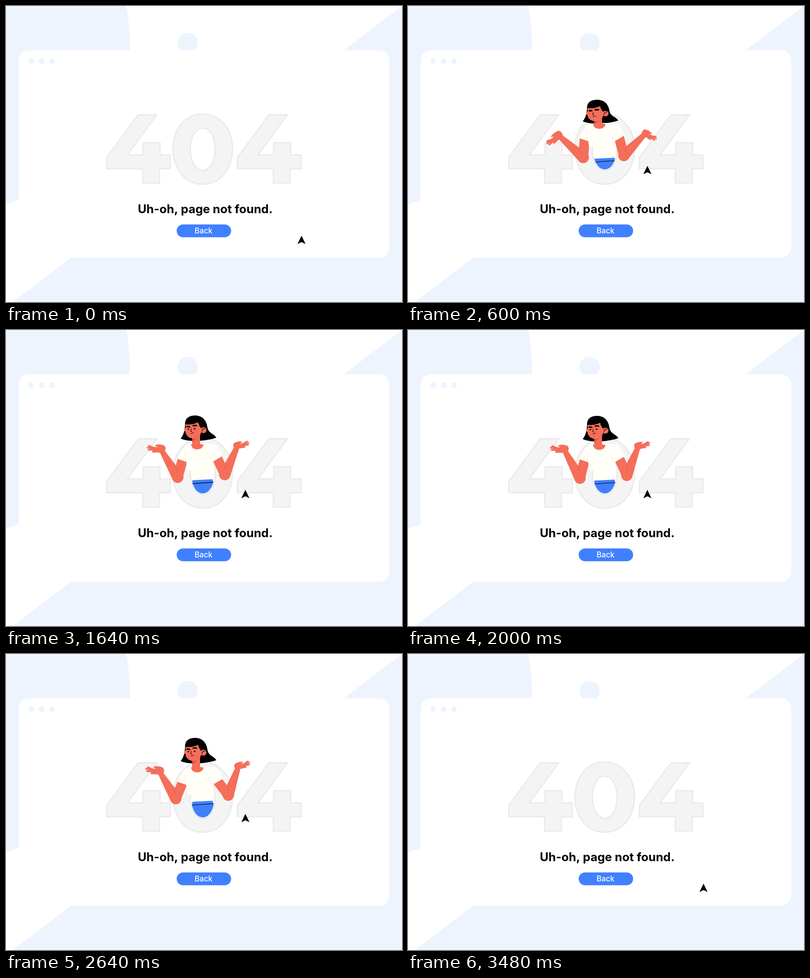
Write an HTML page with a canvas that moves like this. It is 800 px wide and 600 px high and loops after 3520 ms.

```html
<!DOCTYPE html>
<html lang="en">
<head>
<meta charset="utf-8">
<title>404</title>
<style>
  html, body { margin: 0; width: 100%; height: 100%; overflow: hidden; background: #fff; }
  canvas { display: block; width: 800px; height: 600px; }
</style>
</head>
<body>
<canvas id="stage" width="800" height="600"></canvas>
<script>
const ctx = document.getElementById('stage').getContext('2d');
const LOOP = 3520, STEP = 40;
const PALE = '#edf4fe', BLUE = '#4080ff', SKIN = '#f46e59', SHADE = '#d9553f', SHIRT = '#fffef7', INK = '#000';

// Pose: vertical offsets of head, torso and belt, then joints, hand tilt and width factor.
const pose = (head, torso, belt, leftElbow, leftWrist, rightElbow, rightWrist, tilt, width = 1) =>
  [head, torso, belt, ...leftElbow, ...leftWrist, ...rightElbow, ...rightWrist, tilt, width];

const hidden = pose(165, 165, 165, [375, 430], [380, 380], [420, 430], [415, 380], -60, 0.5);
const leap = pose(-87, -78, -72, [345, 225], [286, 185], [447, 220], [498, 180], -12);
const squash = pose(11.5, 5, 3.5, [354, 307], [306, 264], [436, 303], [478, 260], 42);
const wide = pose(11, 4, 3.5, [354, 308], [298, 267], [436, 304], [486, 266], 36);
const rest = pose(0, 0, 0, [348, 302], [319, 245], [442, 296], [462, 239], 0);
const lift = pose(-2, -2, -1.5, [347, 298.5], [314, 244], [442, 293], [467, 237], 0);
const rise = pose(-5, -4, -6.5, [343, 293], [311, 240], [449, 286], [469, 230], -3);
const peak = pose(-27, -24, -22, [350, 270], [318, 218], [442, 266], [462, 212], -12);

const keys = [
  [360, hidden], [480, leap], [600, squash], [660, wide], [860, lift], [1160, rest], [1220, rest],
  [1700, lift], [2300, rest], [2340, rest], [2640, rise], [2700, peak], [2840, hidden]
];

const clamp = v => Math.min(1, Math.max(0, v));
const sineEase = u => (1 - Math.cos(Math.PI * u)) / 2;
const cubicEase = u => u < 0.5 ? 4 * u ** 3 : 1 - 4 * (1 - u) ** 3;
const mix = (a, b, u) => a + (b - a) * u;

function poseAt(t) {
  const i = keys.findIndex(k => k[0] > t);
  const [t0, a] = keys[i - 1], [t1, b] = keys[i];
  const u = sineEase((t - t0) / (t1 - t0));
  return a.map((v, n) => mix(v, b[n], u));
}

function fill(d, color) {
  ctx.fillStyle = color;
  ctx.fill(new Path2D(d));
}

function line(d, width, color = INK, cap = 'round') {
  ctx.strokeStyle = color;
  ctx.lineWidth = width;
  ctx.lineCap = cap;
  ctx.stroke(new Path2D(d));
}

function disc(x, y, r, color) {
  ctx.fillStyle = color;
  ctx.beginPath();
  ctx.arc(x, y, r, 0, 7);
  ctx.fill();
}

function box(x, y, w, h, r, color) {
  ctx.fillStyle = color;
  ctx.beginPath();
  ctx.roundRect(x, y, w, h, r);
  ctx.fill();
}

function label(text, x, y, font, color) {
  ctx.font = font;
  ctx.fillStyle = color;
  ctx.textAlign = 'center';
  ctx.fillText(text, x, y);
}

// Slightly squared oval, as in a heavy zero.
function oval(cx, cy, rx, ry) {
  const kx = rx * 0.57, ky = ry * 0.59;
  return `M${cx - rx},${cy} C${cx - rx},${cy - ky} ${cx - kx},${cy - ry} ${cx},${cy - ry}
    S${cx + rx},${cy - ky} ${cx + rx},${cy} S${cx + kx},${cy + ry} ${cx},${cy + ry}
    S${cx - rx},${cy + ky} ${cx - rx},${cy} Z `;
}

const four = new Path2D('M267,220.5H304.5L245,302H277V277H311V302H332V330H310V359H276V330H203.5V307Z');
const zero = new Path2D(oval(397.5, 290, 60, 71.3) + oval(397.5, 290.5, 25, 43));
const opening = new Path2D(oval(397.5, 290, 23.5, 41.3) + 'M0,0H800V285H0Z');

function backdrop() {
  ctx.fillStyle = '#fff';
  ctx.fillRect(0, 0, 800, 600);
  disc(-95, 70, 345, PALE);
  disc(367, 75, 20.5, PALE);
  fill('M800,0V600H14Z', PALE);
  box(26, 90, 748, 420, 20, '#fff');
  for (const x of [51, 72, 93]) disc(x, 112, 5.6, PALE);

  ctx.lineJoin = 'miter';
  ctx.lineWidth = 2.6;
  ctx.strokeStyle = '#eaeaea';
  ctx.fillStyle = '#f4f4f4';
  for (const [shape, dx] of [[four, 0], [zero, 0], [four, 264]]) {
    ctx.save();
    ctx.translate(dx, 0);
    ctx.fill(shape, 'evenodd');
    ctx.stroke(shape);
    ctx.restore();
  }
  label('Uh-oh, page not found.', 402.5, 420, '700 24px Inter, sans-serif', INK);
  box(344.8, 442.7, 110, 26, 13, BLUE);
  label('Back', 399, 461, '500 15.3px Inter, sans-serif', '#fff');
}

function forearm(ex, ey, wx, wy) {
  const a = Math.atan2(wy - ey, wx - ex) + Math.PI / 2;
  const c = Math.cos(a), s = Math.sin(a), r = 11.5, q = 5;
  fill(`M${ex + c * r},${ey + s * r}L${wx + c * q},${wy + s * q}
    L${wx - c * q},${wy - s * q}L${ex - c * r},${ey - s * r}Z`, SKIN);
  disc(ex, ey, r, SKIN);
  disc(wx, wy, q, SKIN);
}

function hand(x, y, tilt, side, scale) {
  ctx.save();
  ctx.translate(x, y);
  ctx.scale(side * scale, scale);
  ctx.rotate(tilt * Math.PI / 180);
  fill('M-5,3C-8,-1 -8,-7 -4,-9C2,-11 8,-11 12,-9Q11,-7 6,-6L14,-6L17,0Q12,4 5,4Z', SKIN);
  line('M12,-4L22,-8M13,-3L24.5,-5M12,-1L23,-1M9,2L15,2.5', 3, SKIN);
  ctx.restore();
}

function arm(side, shoulderX, shoulderY, ex, ey, wx, wy, tilt) {
  line(`M${shoulderX},${shoulderY}L${ex},${ey}`, 20, SKIN, 'butt');
  forearm(ex, ey, wx, wy);
  if (side < 0) hand(wx, wy, tilt, side, 1.15);
  else hand(wx, wy, tilt - 9, side, 1);
  const dx = wx - ex, dy = wy - ey;
  line(`M${ex - side * 3 + dx * 0.22},${ey + dy * 0.4}l${-dx * 0.12},${-dy * 0.22}`, 0.7, SHADE);
}

function body(torso, belt) {
  const t = y => y + torso, b = y => y + belt;
  fill(`M377,${b(305)}L417,${b(303)}L421,${b(318)}V345H374V${b(318)}Z`, BLUE);
  line(`M376,${b(313)}Q398,${b(311)} 420,${b(310)}`, 1.2);
  fill(`M374,${t(233)}Q362,${t(234)} 358,${t(241)}L346,${t(263)}L364,${t(269)}
    L366,${t(281)}Q370,${b(297)} 377,${b(306)}L417,${b(304)}Q424,${b(296)} 421,${t(284)}
    L416,${t(270)}L438,${t(257)}Q432,${t(240)} 423,${t(233)}L398,${t(232)}Z`, SHIRT);
  line(`M360,${t(248)}L363,${t(268)}M407,${t(250)}L416,${t(269)}`, 0.8, '#ece9df');
}

function neck(torso, head) {
  const y = torso + 238;
  fill(`M376,${head + 213}V${y - 3}H392V${head + 210}Z`, SKIN);
  fill(`M376,${head + 222}Q386,${head + 221} 390,${head + 217}L377,${head + 229}Z`, SHADE);
  fill(`M374,${y - 4}Q375,${y + 6} 387,${y + 6}Q398,${y + 5} 399,${y - 4}L392,${y - 5}H376Z`, SKIN);
}

// Head space drops with the head and flattens a little when it sinks.
function inHead(head, paint) {
  ctx.save();
  ctx.translate(0, head + 227);
  ctx.scale(1, 1 - 0.07 * clamp(head / 12));
  ctx.translate(0, -227);
  paint();
  ctx.restore();
}

function backHair() {
  fill(`M353,222C359,214 361,206 362,192C362,181 369,175.3 382,175.3C397,175.3 405,185 407,200
    C410,212 419,211 425,220C410,226.5 370,230.5 353,222Z`, INK);
}

function face(squint) {
  disc(363.5, 204.5, 3.6, SKIN);
  fill('M363,189V211Q366,221 379,222Q392,221 395,207V189Z', SKIN);
  fill('M361.5,193Q376,195 388,189Q390,198 397,204L407,200C405,185 397,175.3 382,175.3C369,175.3 362,181 361.5,193Z', INK);
  disc(399, 205, 6, SKIN);
  line('M396,207Q397,201 402,202', 1.2);
  if (squint) {
    line('M366,198.5H371.5M378,196.5H385', 2.6);
    line('M366,200H371M378,198H384', 1);
  } else {
    line('M365.5,198Q368,197 371.5,198.5M378,196Q382,194.5 385,196', 2.6);
    disc(368.5, 202.8, 1.5, INK);
    disc(381, 202, 1.6, INK);
  }
  line('M374.5,202L373,207.5H375.5M373.5,212Q376,209.5 379,210.5', 1);
}

function figure(t) {
  const [head, torso, belt, lex, ley, lwx, lwy, rex, rey, rwx, rwy, tilt, width] = poseAt(t);
  ctx.save();
  ctx.lineJoin = 'round';
  if (width < 0.99) ctx.clip(opening);
  ctx.translate(398, 0);
  ctx.scale(width, 1);
  ctx.translate(-398, 0);

  arm(-1, 357, 264 + torso, lex, ley, lwx, lwy, tilt);
  arm(1, 426, 260 + torso, rex, rey, rwx, rwy, tilt);
  inHead(head, backHair);

  ctx.save();
  ctx.clip(opening);
  body(torso, belt);
  ctx.restore();
  neck(torso, head);
  inHead(head, () => face(t >= 560 && t < 720));
  ctx.restore();
}

const bezier = (a, b, c, d, u) =>
  a * (1 - u) ** 3 + 3 * b * u * (1 - u) ** 2 + 3 * c * u * u * (1 - u) + d * u ** 3;

function cursor(t) {
  let x, y;
  if (t < 2800) {
    const u = cubicEase(clamp(t / 500));
    x = mix(597, 483.6, u);
    y = mix(465.5, 324, u);
  } else {
    const u = cubicEase(clamp((t - 2820) / 660));
    x = bezier(483.6, 483.6, 557, 597, u);
    y = bezier(324, 361, 491.5, 465.5, u);
  }
  fill(`M${x},${y}l8.2,17l-8.2,-4l-8.2,4Z`, INK);
}

function draw(now) {
  const t = Math.floor((now % LOOP) / STEP) * STEP;
  backdrop();
  if (t > 360 && t < 2840) figure(t);
  cursor(t);
}

let start;
function tick(now) {
  start ??= now;
  draw(now - start);
  requestAnimationFrame(tick);
}
draw(0);
requestAnimationFrame(tick);
</script>
</body>
</html>
```
